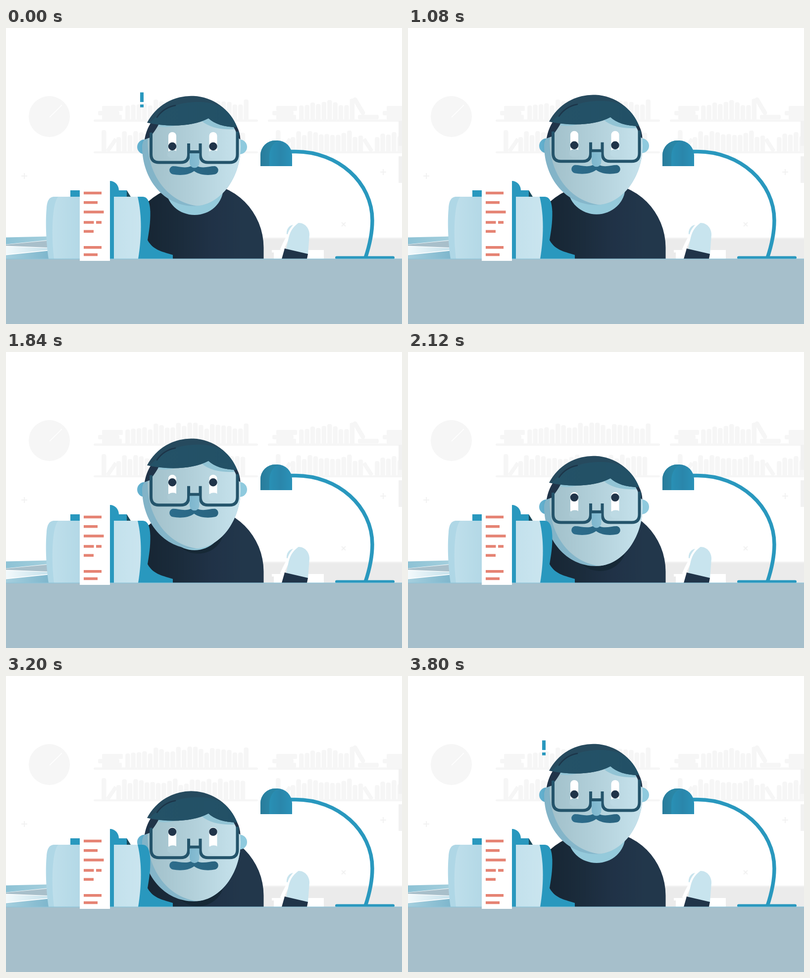
Animation of 800 by 600 pixels, one loop 3.84 s. Source, as an HTML page with a canvas:

```html
<!DOCTYPE html>
<html lang="en">
<head>
<meta charset="utf-8">
<title>Desk</title>
<style>
html, body { margin: 0; width: 100%; height: 100%; overflow: hidden; background: #fff; }
canvas { display: block; width: 800px; height: 600px; }
</style>
</head>
<body>
<canvas id="stage" width="800" height="600"></canvas>
<script>
const ctx = document.getElementById('stage').getContext('2d');
const LOOP = 3840, STEP = 40;
const NAVY = '#203449', BLUE = '#2998be', FRAME = '#24546b', PALE = '#c8e4ee', GREY = '#f6f6f6';

function ramp(a, b, t) {
  return Math.min(1, Math.max(0, (t - a) / (b - a)));
}

// Cubic Bezier ease with handles (x1, 0) and (x2, 1), solved by bisection
function ease(u, x1, x2) {
  let lo = 0, hi = 1, s = 0.5;
  for (let i = 0; i < 24; i++) {
    const x = 3 * (1 - s) * (1 - s) * s * x1 + 3 * (1 - s) * s * s * x2 + s * s * s;
    if (x < u) lo = s; else hi = s;
    s = (lo + hi) / 2;
  }
  return s * s * (3 - 2 * s);
}

function pose(t) {
  const lift = -9.2 * ease(ramp(880, 1400, t), 0.6, 0.4);
  const sink = 104.9 * ease(ramp(1400, 3120, t), 0.38, 0.01);
  const glance = -19.8 * (1 - 2 ** (-11 * ramp(1600, 3200, t)));
  const back = ramp(3320, 3800, t);
  const stay = 1 - ease(back, 1 / 3, 2 / 3);
  return {
    dy: (lift + sink) * stay,
    look: glance * stay,
    alert: Math.max(1 - ramp(320, 840, t), back)
  };
}

function shade(x0, x1, ...cols) {
  const g = ctx.createLinearGradient(x0, 0, x1, 0);
  cols.forEach((c, i) => g.addColorStop(i / (cols.length - 1), c));
  return g;
}

function rect(x, y, w, h, col, r = 0) {
  ctx.fillStyle = col;
  ctx.beginPath();
  ctx.roundRect(x, y, w, h, r);
  ctx.fill();
}

function oval(x, y, rx, ry, col) {
  ctx.fillStyle = col;
  ctx.beginPath();
  ctx.ellipse(x, y, rx, ry, 0, 0, 7);
  ctx.fill();
}

function fill(d, col) {
  ctx.fillStyle = col;
  ctx.fill(new Path2D(d));
}

function line(d, col, w, cap = 'butt') {
  ctx.strokeStyle = col;
  ctx.lineWidth = w;
  ctx.lineCap = cap;
  ctx.stroke(new Path2D(d));
}

function random(seed) {
  return () => (seed = seed * 16807 % 2147483647) / 2147483647;
}

function books(x, end, base, seed) {
  const rnd = random(seed);
  for (; x < end; x += 11.4) {
    const h = 29 + 14 * rnd();
    rect(x, base - h, 9.5, h, GREY, [4, 4, 0, 0]);
  }
}

function pile(x) {
  rect(x, 158, 42, 10, GREY, 2);
  rect(x - 8, 168, 43, 9, GREY, 3);
  rect(x, 176, 40, 10, GREY, 2);
}

function shelf(x, w) {
  rect(x, 185.5, w, 4.5, GREY, 2);
  rect(x, 250, w, 4, GREY, 2);
  pile(x + 17);
  rect(x + 16, 207, 9.5, 43, GREY, [4, 4, 0, 0]);
  line(`M${x + 28} 250L${x + 45} 225`, GREY, 8);
}

function room() {
  rect(0, 0, 800, 600, '#fff');
  oval(87.5, 179.5, 41.5, 41.5, GREY);
  line('M88 181L113 156', '#fff', 1.6);
  shelf(177, 332);
  shelf(529, 271);
  pile(769);
  books(241, 490, 186, 77);
  books(592, 700, 186, 31);
  books(223, 480, 250, 52);
  books(575, 720, 250, 52);
  books(745, 800, 250, 19);
  line('M705 145L721 172', GREY, 9, 'round');
  line('M723 225L739 250', GREY, 8);
  rect(711, 176, 42, 9, GREY, 3);
  rect(793, 188, 7, 51, '#f1f1f1');
  rect(793, 260, 7, 54, '#f1f1f1');
  line('M31 300H43M37 294V306M756 292H768M762 286V298M678 394L686 402M686 394L678 402', '#f2f2f2', 2);
  rect(400, 425, 400, 4, '#f1f1f1');
  rect(400, 428, 400, 40, '#ebebeb');
  rect(541, 450, 101, 18, '#fff');
  rect(537, 450, 20, 5, '#fff');
}

function lamp() {
  line('M576 250.5H585C671 250.5 740 313 740 390C740 420 733 445 726 466', BLUE, 7.5);
  line('M668 465.5H782', BLUE, 6, 'round');
  rect(514, 228, 64, 52, shade(532, 578, '#2990b5', '#2a86ab', '#2a92b8'), [30, 30, 0, 0]);
  fill('M514 280V258A30 30 0 0 1 544 228H551C539 233 532 244 532 262V280Z', shade(514, 534, '#297c9b', '#2a86a6'));
}

function hand() {
  line('M557 450Q565 431 574 417L592 396', '#fff', 7);
  fill('M566 448L571 425C575 408 584 400 591 395C604 395 613 406 613 419L610 459Z', PALE);
  fill('M567 418C566 408 572 400 580 399C574 406 571 411 569 418Z', PALE);
  fill('M563 447L610 458L608 468H557Z', NAVY);
}

const TORSO = 'M244 468V445A146 131 0 0 1 390 314A130.5 131 0 0 1 520.5 445V468Z';

function torso(dy) {
  ctx.save();
  fill(TORSO, shade(288, 480, '#172634', '#1b2c3c', '#203247', '#22374b'));
  ctx.clip(new Path2D(TORSO));
  oval(388, 322 + dy, 52, 49, 'rgba(18,36,46,.6)');
  ctx.restore();
  oval(381, 324 + dy * 0.6, 58, 55, '#95cadb');
}

function eye(x, look) {
  rect(x - 8, 211, 16, 39, '#fff', [8, 8, 0, 0]);
  oval(x + 1, 256, 11, 8.5, x < 380 ? '#adcbd5' : '#bddae4');
  oval(x, 240 + look, 8.2, 8.2, NAVY);
}

const FACE = 'M275 240C275 234 277 230 280 225L293 194L330 170H440L466 200A100 100 0 0 1 474 240C474 305 432 361 380 361C320 361 275 308 275 240Z';
const FRINGE = '467 201C440 201 421 194 409 183C378 200 328 201';

function head(dy, look) {
  ctx.save();
  ctx.translate(0, dy);
  oval(280, 241, 15, 15, shade(265, 285, '#67b3d1', '#55a5c4'));
  oval(472, 241, 15, 15, '#8fcade');

  fill(FACE, shade(275, 474, '#82b3c7', '#86b8cc', '#86bbd0'));
  ctx.save();
  ctx.clip(new Path2D(FACE));
  fill('M286 140H480V361H390C330 356 286 300 286 230Z', shade(286, 470, '#a1c0ca', '#b2d0da', '#c6e2ec'));
  fill('M290 190C305 204 325 202 345 197L409 183L395 188C412 203 436 207 470 205V180H290Z', '#92c4d5');
  ctx.restore();

  fill('M294 190C286 202 282 214 280 226L291 222C297 213 304 205 309 194Z', NAVY);
  fill('M460 192L466.5 200Q473 212 473.5 226L468 222Q465 208 458 198Z', NAVY);
  fill(`M285 192A100 100 0 0 1 ${FRINGE} 285 192Z`, '#264a5e');
  fill(`M289 192.5C306 180 325 149 393 150C430 151 452 165 ${FRINGE} 289 192.5Z`, shade(300, 467, '#245267', '#225066'));
  line('M305 181C314 168 325 160 342 157', '#1c3549', 2.6, 'round');

  eye(336, look);
  eye(418.5, look);

  line('M293 212V256Q293 272.5 309 272.5H353Q369 272.5 369 256V234M369 251H392.5M392.5 234V256Q392.5 272.5 408 272.5H452Q467.5 272.5 467.5 256V210', FRAME, 6);
  fill('M337 280C350 280 362 286 376 279H384C398 286 409 280 422 280A8.4 8.4 0 0 1 422 296.5C410 299 392 299 380 290C368 299 350 299 337 296.5A8.4 8.4 0 0 1 337 280Z', shade(328, 431, '#2d6d8c', '#29637f'));
  rect(371, 254, 19.5, 29.5, shade(371, 391, '#7db6cd', '#8abfd4'), [0, 0, 10, 10]);
  ctx.restore();
}

function papers() {
  fill('M0 424.5L84 422.5V430L0 438.5Z', shade(0, 84, '#8dc2d5', '#a4cfdd'));
  fill('M0 439L84 431V445L0 441.5Z', '#a8bfca');
  fill('M0 443L85 446V450L0 459Z', shade(0, 84, '#f3fafc', '#c5e1eb'));
  fill('M0 460.5L86 451.5V468H0Z', shade(0, 84, '#a5cfde', '#7fb7cd'));
}

function printer() {
  rect(130, 329, 24, 16, BLUE);
  fill('M210 310A18 19 0 0 1 228 329H244V345H210Z', BLUE);
  fill('M244 329L252 342H244Z', '#1b4a5c');
  fill('M264 342H276C288 342 291 357 291.5 372C292 395 289 412 286 430C298 452 320 454 337 460V468H264Z', BLUE);
  fill('M98 342C86 342 83 352 82 365C79 400 82 440 86 468H160V342Z', '#afd7e6');
  fill('M106 342C93 352 91 420 97 468H160V342Z', shade(92, 150, '#bfdfeb', '#b3d8e6'));
  rect(210, 325, 8, 143, BLUE);
  fill('M218 342H266C275 380 274 425 267 468H218Z', shade(218, 273, '#c3e1ec', '#cae5ef'));
}

function desk() {
  rect(0, 468, 800, 132, '#a6bfcb');
  rect(0, 467.5, 800, 1.5, '#92c4d7');
  rect(149, 318, 61, 154, '#fff', [6, 0, 0, 0]);
  line('M157 334.5h36M157 353.7h28M157 373h40.5M157 394h20.5m4.5 0h11M157 412.3h20M157 444.7h36M157 459.4h28', '#e58373', 5.5);
}

function alarm(alpha) {
  ctx.globalAlpha = alpha;
  rect(271, 130.5, 7, 19.5, BLUE);
  rect(271, 155, 7, 5.8, BLUE);
  ctx.globalAlpha = 1;
}

function draw(t) {
  const { dy, look, alert } = pose(t);
  room();
  lamp();
  hand();
  torso(dy);
  head(dy, look);
  papers();
  printer();
  desk();
  alarm(alert);
}

const start = performance.now();
function tick() {
  const t = (performance.now() - start) % LOOP;
  draw(Math.floor(t / STEP) * STEP);
  requestAnimationFrame(tick);
}
tick();
</script>
</body>
</html>
```
